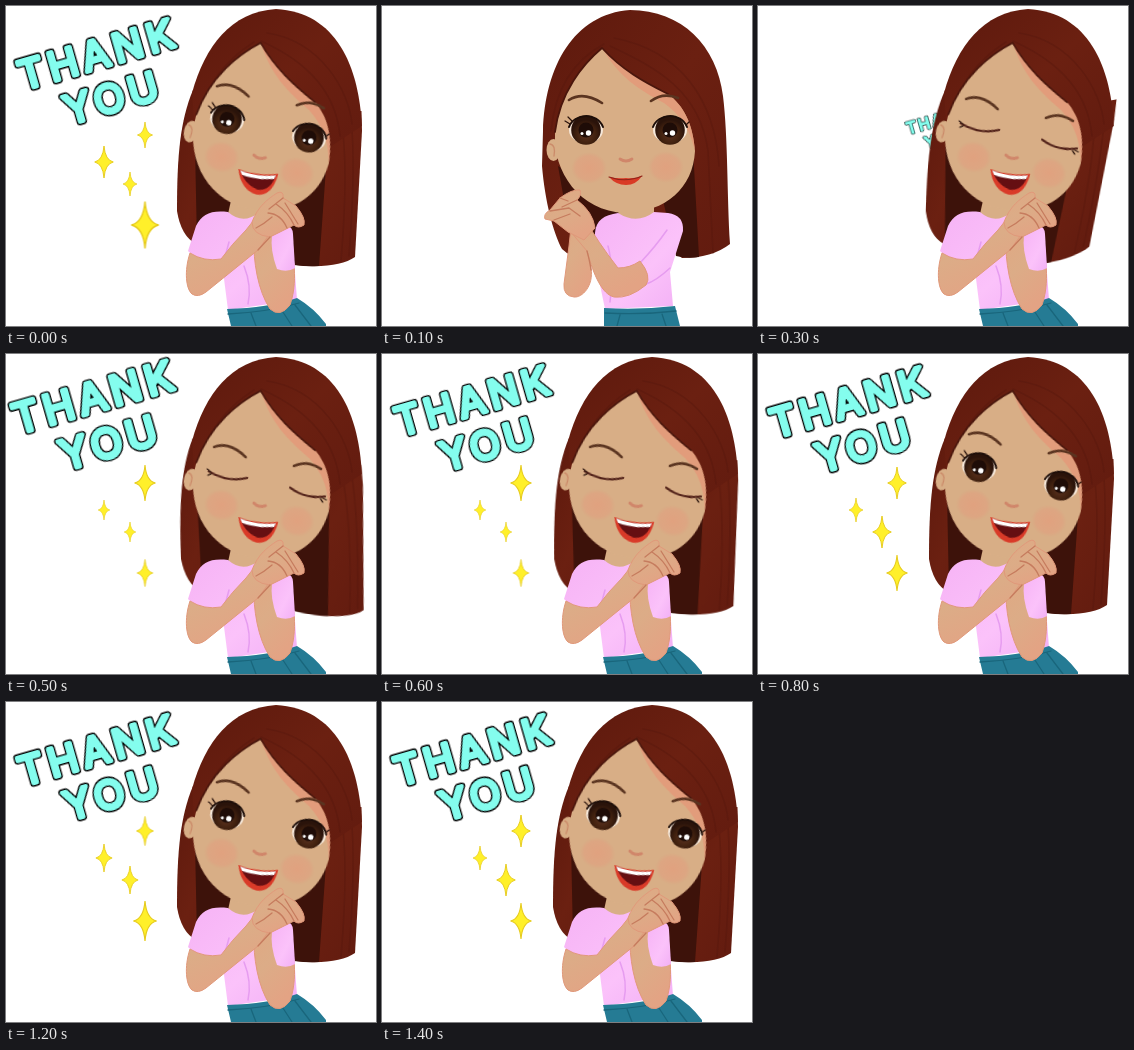
An HTML page that plays this animation: 370x320 px, repeating every 1500 ms.

```html
<!DOCTYPE html>
<html lang="en">
<head>
<meta charset="utf-8">
<title>Thank you</title>
<style>
html, body { margin: 0; width: 100%; height: 100%; overflow: hidden; background: #fff; }
svg { display: block; width: 370px; height: 320px; }

/* 15 poses of 100 ms each, switched without easing */
.calm, .glad, .open, .shut, .brows, .face, .words, .star, .sway, .lock {
  animation: 1500ms step-end infinite;
}
.calm { animation-name: calm; }
.glad { animation-name: glad; }
.open { animation-name: open; }
.shut { animation-name: shut; }
.brows { animation-name: brows; }
.face { animation-name: face; }
.words { animation-name: words; }
.sway { animation-name: sway; transform-origin: 290px 115px; }
.lock { animation-name: lock; transform-origin: 190px 90px; }
.s1 { animation-name: s1; }
.s2 { animation-name: s2; }
.s3 { animation-name: s3; }
.s4 { animation-name: s4; }

@keyframes calm { 0%, 20% { visibility: hidden; } 6.667% { visibility: visible; } }
@keyframes glad { 0%, 20% { visibility: visible; } 6.667% { visibility: hidden; } }
@keyframes open {
  0%, 46.667%, 93.333% { visibility: visible; }
  13.333%, 86.667% { visibility: hidden; }
}
@keyframes shut {
  0%, 46.667%, 93.333% { visibility: hidden; }
  13.333%, 86.667% { visibility: visible; }
}
@keyframes brows {
  0%, 46.667%, 93.333% { transform: none; }
  13.333%, 86.667% { transform: translateY(13px); }
}
@keyframes face {
  0%, 20% { transform: translate(262px, 122.5px) rotate(12.7deg) translate(-246px, -124px); }
  6.667% { transform: none; }
}
@keyframes words {
  0%, 46.667% { transform: translate(96px, 70px) rotate(-16deg); visibility: visible; }
  6.667% { transform: none; visibility: hidden; }
  20% { transform: translate(182px, 123px) rotate(-16deg) scale(.4); visibility: visible; }
  26.667% { transform: translate(134px, 93px) rotate(-16deg) scale(.75); visibility: visible; }
  33.333% { transform: translate(93px, 66px) rotate(-16deg) scale(1.03); visibility: visible; }
  40% { transform: translate(96px, 69px) rotate(-16deg) scale(.99); visibility: visible; }
}
@keyframes sway {
  0%, 46.667% { transform: none; }
  20% { transform: skewX(-8deg) skewY(-10deg); }
  26.667% { transform: skewX(-2deg) skewY(-3deg); }
  33.333% { transform: skewX(3.5deg) skewY(5deg); }
  40% { transform: skewX(1deg) skewY(1deg); }
}
@keyframes lock {
  0%, 46.667% { transform: none; }
  20% { transform: skewX(-1.6deg); }
  26.667% { transform: skewX(0deg); }
  33.333% { transform: skewX(2deg); }
  40% { transform: skewX(.6deg); }
}
@keyframes s1 {
  0%, 66.667% { transform: scale(13); }
  6.667% { transform: scale(0); }
  26.667% { transform: scale(8); }
  33.333% { transform: scale(18); }
  46.667%, 53.333%, 93.333% { transform: scale(16); }
  60%, 80% { transform: scale(14.5); }
}
@keyframes s2 {
  0%, 66.667% { transform: scale(16); }
  6.667% { transform: scale(0); }
  26.667% { transform: scale(6); }
  33.333% { transform: scale(10); }
  46.667%, 53.333%, 93.333% { transform: scale(12); }
  60%, 80% { transform: scale(14); }
}
@keyframes s3 {
  0%, 66.667% { transform: scale(12); }
  6.667% { transform: scale(0); }
  26.667% { transform: scale(6); }
  33.333% { transform: scale(10); }
  46.667%, 53.333%, 93.333% { transform: scale(16); }
  60%, 80% { transform: scale(14); }
}
@keyframes s4 {
  0%, 66.667% { transform: scale(23.5); }
  6.667% { transform: scale(0); }
  26.667% { transform: scale(8); }
  33.333% { transform: scale(13.5); }
  46.667%, 53.333%, 93.333% { transform: scale(18); }
  60%, 80% { transform: scale(20); }
}

.words text {
  font: 400 40px Inter, "Noto Sans", sans-serif;
  letter-spacing: 5px;
  text-anchor: middle;
  stroke-linejoin: round;
  stroke-linecap: round;
}
.edge { fill: #000; stroke: #000; stroke-width: 6.8; }
.fill { fill: #84fdee; stroke: #84fdee; stroke-width: 4.2; }
.star { fill: #fff02a; stroke: #e6cb1e; stroke-width: .06; }
.hair { fill: url(#hair); }
.dark { fill: #3d120a; }
.skin { fill: #d8ae86; }
.arm { fill: url(#arm); stroke: #e0987a; stroke-width: 1; }
.shirt { fill: url(#shirt); }
.skirt { fill: #257b94; }
.line { fill: none; stroke-linecap: round; stroke-linejoin: round; }
.strand { stroke: #56170d; stroke-width: 1.5; opacity: .4; }
.fold { stroke: #e69cf0; stroke-width: 1.5; }
.crease { stroke: #c67c5e; stroke-width: 1.3; }
.pleat { stroke: #19667c; stroke-width: 1.3; }
.brow { stroke: #5a3420; stroke-width: 2.6; }
.lash { stroke: #1c0d08; stroke-width: 2; }
.tip { stroke: #2a130b; stroke-width: 1.2; }
.lid { stroke: #53231a; stroke-width: 2.2; }
</style>
</head>
<body>
<svg viewBox="0 0 370 320">
  <defs>
    <linearGradient id="hair" x1="0" y1="0" x2="1" y2="1">
      <stop offset="0" stop-color="#5d190d"/>
      <stop offset=".5" stop-color="#6b2011"/>
      <stop offset="1" stop-color="#621b0f"/>
    </linearGradient>
    <linearGradient id="arm" x1="0" y1="0" x2=".5" y2="1">
      <stop offset="0" stop-color="#e0a883"/>
      <stop offset=".5" stop-color="#dcac87"/>
      <stop offset="1" stop-color="#e3a384"/>
    </linearGradient>
    <linearGradient id="shirt" x1="0" y1="0" x2="1" y2="1">
      <stop offset="0" stop-color="#f6b3f5"/>
      <stop offset=".6" stop-color="#fbc2fa"/>
      <stop offset="1" stop-color="#f2b0f5"/>
    </linearGradient>
    <radialGradient id="blush">
      <stop offset="0" stop-color="#e49c7c" stop-opacity=".7"/>
      <stop offset=".75" stop-color="#e29d7e" stop-opacity=".5"/>
      <stop offset="1" stop-color="#dca07e" stop-opacity="0"/>
    </radialGradient>
    <radialGradient id="iris" cy=".65">
      <stop offset="0" stop-color="#5d3320"/>
      <stop offset=".65" stop-color="#41210f"/>
      <stop offset="1" stop-color="#2a130a"/>
    </radialGradient>
    <path id="spark" d="M0-1Q.07-.12 .58 0Q.07 .12 0 1Q-.07 .12-.58 0Q-.07-.12 0-1Z"/>
    <g id="eye">
      <ellipse rx="17" ry="13.5" fill="#f6e8da"/>
      <circle r="14.8" fill="url(#iris)"/>
      <circle r="7.5" fill="#1e0c07"/>
      <circle cx="2.5" cy="3" r="2.7" fill="#fff"/>
      <circle cx="-4" cy="3.5" r="1.5" fill="#fff"/>
      <path class="line lash" d="M-17-3C-12-17 11-18 17-3"/>
    </g>
  </defs>

  <g class="words">
    <text class="edge" x="2.5" y="-8.5">THANK</text>
    <text class="edge" x="5" y="38">YOU</text>
    <text class="fill" x="2.5" y="-8.5">THANK</text>
    <text class="fill" x="5" y="38">YOU</text>
  </g>

  <g transform="translate(139 129)"><use href="#spark" class="star s1"/></g>
  <g transform="translate(98 156)"><use href="#spark" class="star s2"/></g>
  <g transform="translate(124 178)"><use href="#spark" class="star s3"/></g>
  <g transform="translate(139 219)"><use href="#spark" class="star s4"/></g>

  <g class="calm">
    <path class="hair" d="M248 4C192 8 163 60 161 125L160 160C163 195 171 226 180 243Q190 253 205 252L230 200L300 252Q330 252 348 238C345 190 346 130 341 90C335 40 300 4 248 4Z"/>
    <path class="dark" d="M310 125L317 251Q305 253 294 250L280 190ZM176 160L192 250L215 240L242 210L230 190Z"/>
    <path class="line strand" d="M228 40C275 62 318 85 326 145L331 247M232 32C300 45 333 95 337 160M222 38C190 55 173 85 169 125"/>
    <path class="skin" d="M238 195L236 210Q254 224 272 210V195Z"/>
    <path class="shirt" d="M236 207C222 209 214 214 213 227L212 250L223 303L291 300L288 266L301 225Q302 209 286 207L272 206Q255 219 236 207Z"/>
    <path class="line fold" d="M285 224Q274 240 258 257M288 262Q274 275 264 278M226 240Q232 262 228 296"/>
    <path class="skirt" d="M222 302Q258 304 293 300L298 320H222Z"/>
    <path class="line pleat" d="M223 307Q260 309 294 305M238 309L235 320M280 308L284 320"/>
  </g>

  <g class="glad">
    <g class="sway">
      <path class="hair" d="M290 105H355.500L356 125L349 251C335 261 305 263 270 256Z"/>
      <path class="dark" d="M323 120L313 260Q293 261 268 256L275 190L290 110Z"/>
      <path class="line strand" d="M335 112Q343 160 335 255M345 112Q350 160 343 250"/>
    </g>
    <g class="lock">
      <path class="hair" d="M187 84C174 115 171 150 171 205Q175 230 190 238H215L230 150Z"/>
      <path class="dark" d="M189 140L191 238H228L228 190Z"/>
    </g>
    <path class="hair" d="M270 3C225 6 199 40 186 87L189 130L200 150L310 150L355.800 120C353 60 330 6 270 3Z"/>
    <path class="line strand" d="M255 35C300 55 330 85 334 130M261 27C315 35 343 85 346 118M248 36C218 55 200 80 191 112"/>
    <path class="skin" d="M226 190L222 208Q240 222 256 210L262 190Z"/>
    <path class="shirt" d="M222 206C205 204 196 208 190 220L182 245C192 256 205 260 216 257L222 304L291 294L286 226C276 212 263 206 252 207Q237 219 222 206Z"/>
    <path class="line fold" d="M216 257Q221 246 223 236M238 260Q246 280 242 298"/>
    <path class="skirt" d="M221 303Q262 302 291 292Q308 302 320 318V320H225Z"/>
    <path class="line pleat" d="M222 308Q262 306 293 297M245 307L250 320M275 303L286 320M289 299L305 320"/>
  </g>

  <g class="face">
    <ellipse class="skin" cx="171.500" cy="144" rx="7" ry="11"/>
    <path class="line crease" d="M168 138Q174 139 172 150" opacity=".7"/>
    <path class="skin" d="M220 42C201 58 178 86 173 128C171 165 197 205 243 207C284 206 311 182 313 145C311 118 302 100 286 88C262 76 240 64 220 42Z"/>
    <path fill="#e59878" d="M220 42C240 64 262 76 286 88C302 100 311 118 313 145C307 120 298 109 282 97C257 84 236 70 220 42Z" opacity=".8"/>
    <path class="line" d="M173 126C178 86 201 58 220 42C240 64 262 76 286 88" stroke="#4a160c" stroke-width="1.8"/>
    <ellipse cx="207" cy="162" rx="18" ry="16" fill="url(#blush)"/>
    <ellipse cx="284" cy="161" rx="18" ry="16" fill="url(#blush)"/>
    <path class="line" d="M238 153Q244 157 250 153" stroke="#d0866a" stroke-width="2.8"/>
    <g class="brows">
      <path class="line brow" d="M187 94Q201 85 220 97M269 95Q281 86 296 92"/>
    </g>
    <g class="open">
      <use href="#eye" x="204" y="124"/>
      <use href="#eye" x="288" y="124"/>
      <path class="line tip" d="M188 118L183 115M190 115L186 111M304 119L307 116"/>
    </g>
    <g class="shut">
      <path class="line lid" d="M187 132Q207 139 226 130M270 130Q288 138 306 131"/>
      <path class="line tip" d="M189 132L185 130M190 134L187 136M304 133L308 134M302 134L305 137"/>
    </g>
    <g class="calm">
      <path d="M227 171Q236 173 244 172Q252 173 260 170Q254 179 244 179Q234 179 227 171Z" fill="#d93a25"/>
      <path class="line" d="M227 171Q244 177 260 170" stroke="#8e241a" stroke-width="1.2"/>
    </g>
    <g class="glad">
      <path d="M226 170Q246 173 266 166Q265 190 249 191Q233 190 226 170Z" fill="#d93a28"/>
      <path d="M228 171Q246 174 264 168Q262 185 249 186Q236 184 228 171Z" fill="#650f12"/>
      <path d="M228 171Q246 174 264 168L263 172Q247 177 231 175Z" fill="#fff"/>
    </g>
  </g>

  <g class="calm">
    <path class="arm" d="M207 222L209 262C212 280 200 292 192 291Q181 290 182 278L187 240L190 212Z"/>
    <path class="arm" d="M258 255Q270 270 264 279Q247 293 232 291C220 288 212 270 205 245L188 225L203 213Q215 235 236 262Q248 262 258 255Z"/>
    <path class="arm" d="M163 213Q161 208 168 204L178 192Q190 183 198 184Q200 189 195 194Q211 206 213 222L202 234L186 226L172 215Z"/>
    <path class="line crease" d="M195 194L180 201M168 205L187 202L198 210M172 214L188 208M205 245Q208 256 209 264M178 192L186 195"/>
  </g>

  <g class="glad">
    <path class="arm" d="M248 232C247 255 252 285 264 303Q274 312 284 299C289 285 289 270 288 258L276 222Z"/>
    <path class="shirt" d="M274 222Q286 216 287 228L289 262Q281 267 271 263Q264 244 266 230Z"/>
    <path class="arm" d="M184 247C178 265 180 283 186 288Q192 292 200 286L252 244L268 222L255 205L240 224Q226 238 215 253Q198 256 184 247Z"/>
    <path class="arm" d="M246 216C252 200 262 193 271 187Q278 184 277 192L290 200Q300 212 298 219Q292 223 288 219L264 231Q246 229 246 216Z"/>
    <path class="line crease" d="M277 192L263 203M270 198Q282 206 288 219M279 197L292 218M262 207Q275 208 281 222M250 222Q258 218 266 211M264 231L252 244"/>
  </g>
</svg>
</body>
</html>
```
